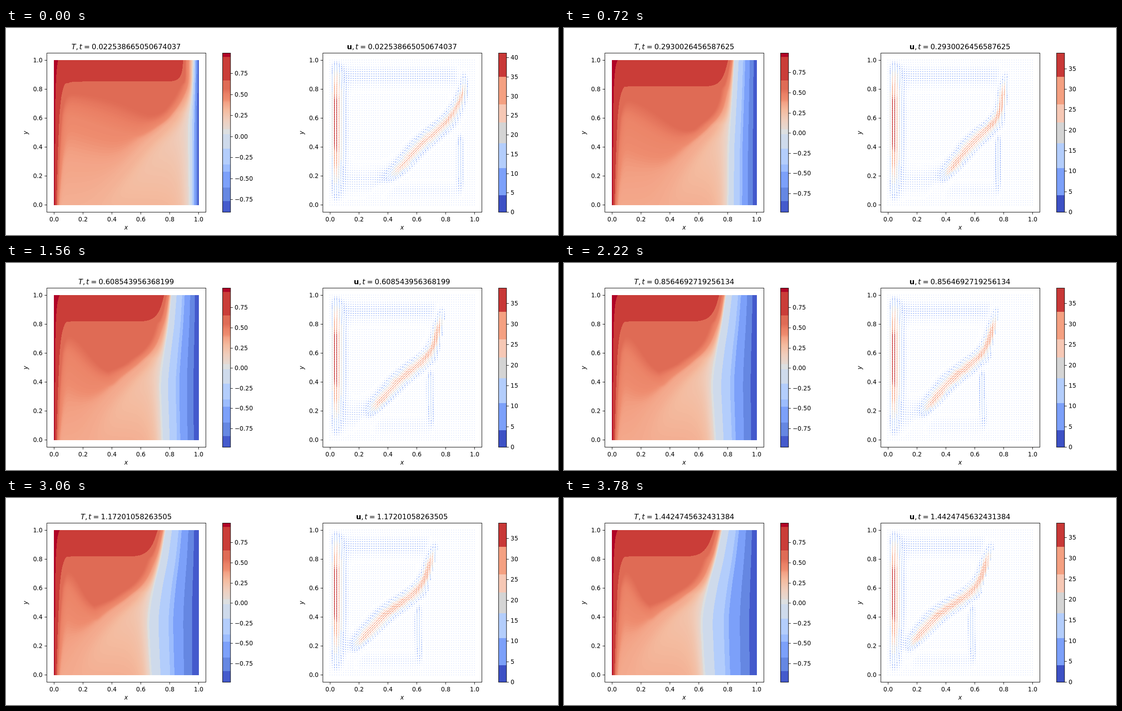
These frames come from a looping animation (1222x458 px, 3840 ms). An HTML page with a canvas:

```html
<!DOCTYPE html>
<html lang="en">
<head>
<meta charset="utf-8">
<style>
html, body { margin: 0; width: 1222px; height: 458px; overflow: hidden; background: #fff; }
canvas { display: block; }
</style>
</head>
<body>
<canvas id="c" width="1222" height="458"></canvas>
<script>
const ctx = document.getElementById('c').getContext('2d', { willReadFrequently: true });
const FONT = '"DejaVu Sans", sans-serif';
const TOP = 55.5, BOTTOM = 407.5, SIDE = 352, INSET = 16, SPAN = 320.5;
const STEP_MS = 60, STEPS = 64, DT = 0.022538665050674037;

// Shapes of the jet axis and the freezing front, sampled at y = 0, .2 ... 1
const KEY_STEPS = [0, 12, 26, 37, 45, 57, 63];
const JET = [
  [.26, .44, .615, .825, .922, .92],
  [.29, .405, .56, .75, .8, .825],
  [.2, .3, .47, .685, .755, .785],
  [.17, .265, .425, .65, .73, .765],
  [.1, .205, .38, .625, .71, .75],
  [.08, .18, .355, .6, .69, .735],
  [.06, .165, .335, .595, .685, .73]];
const FRONT = [
  [.945, .945, .945, .948, .957, .965],
  [.803, .805, .808, .82, .833, .845],
  [.75, .742, .737, .76, .79, .81],
  [.715, .703, .695, .72, .757, .787],
  [.69, .677, .67, .7, .745, .775],
  [.655, .645, .643, .675, .725, .765],
  [.64, .628, .623, .66, .715, .76]];
const STRATA = [[0, .355], [.29, .395], [.6, .46], [.72, .54], [.815, .63], [.82, .66], [1, .9]];

// Colour bands: lower bound and colour; a third entry marks a smooth stretch
const HEAT = [[0, '#445acc'], [.07, '#6587e2'], [.155, '#7ca0f9'], [.255, '#9cbcfd'],
  [.3, '#b3cdfb'], [.4, '#cedaeb'], [.49, '#dcdfe0'], [.52, '#e3d9d3', 1], [.58, '#efcebd', 1],
  [.64, '#f4bb9f', 1], [.69, '#f3a184', 1], [.707, '#ee8c6f', 1], [.745, '#ea7f64', 1],
  [.775, '#df6b55'], [.828, '#ca3d38'], [.977, '#b00426']];
const SPEED = [[0, '#3d51c5'], [.107, '#7ca0f9'], [.278, '#b3cdfb'], [.434, '#d4d4d4'],
  [.565, '#f6c8b5'], [.677, '#f4a081'], [.85, '#c83837']];

const clamp = (v, a = 0, b = 1) => Math.min(b, Math.max(a, v));
const mix = (a, b, k) => a + (b - a) * k;
const smooth = (a, b, v) => { const k = clamp((v - a) / (b - a)); return k * k * (3 - 2 * k); };
const bell = (v, mid, w) => Math.exp(-(((v - mid) / w) ** 2));

function curve(p, y) {
  const s = clamp(y) * 5, i = Math.min(4, Math.floor(s)), k = s - i;
  const b = p[i], c = p[i + 1], a = i ? p[i - 1] : 2 * b - c, d = i < 4 ? p[i + 2] : 2 * c - b;
  return b + k / 2 * (c - a + k * (2 * a - 5 * b + 4 * c - d + k * (3 * (b - c) + d - a)));
}

function blend(table, step) {
  let i = 0;
  while (i < 5 && step > KEY_STEPS[i + 1]) i++;
  const from = Math.log(KEY_STEPS[i] + 1), to = Math.log(KEY_STEPS[i + 1] + 1);
  const k = (Math.log(step + 1) - from) / (to - from);
  return table[i].map((v, j) => mix(v, table[i + 1][j], k));
}

function strata(y) {
  let i = 1;
  while (i < STRATA.length - 1 && y > STRATA[i][0]) i++;
  const [y0, a] = STRATA[i - 1], [y1, b] = STRATA[i];
  return mix(a, b, (y - y0) / (y1 - y0));
}

function ramp(bands) {
  const g = ctx.createLinearGradient(0, BOTTOM, 0, TOP);
  bands.forEach(([at, color, soft], i) => {
    g.addColorStop(at, color);
    const next = bands[i + 1];
    if (!soft) g.addColorStop(next ? next[0] : 1, color);
  });
  return g;
}

function lookup(gradient) {
  ctx.fillStyle = gradient;
  ctx.fillRect(0, 56, 1, 351);
  return ctx.getImageData(0, 56, 1, 351).data;
}

const heatRamp = ramp(HEAT), speedRamp = ramp(SPEED);
const heatLut = new Uint32Array(lookup(heatRamp).buffer);
const speedData = lookup(speedRamp);
const speedCss = Array.from({ length: 351 }, (_, i) => `rgb(${speedData.slice(i * 4, i * 4 + 3).join()})`);
const lutIndex = f => Math.round((1 - clamp(f)) * 350);

function rowShape(s, y) {
  const jet = curve(s.jet, y), front = curve(s.front, y);
  const slope = (curve(s.jet, y + .02) - curve(s.jet, y - .02)) / (clamp(y + .02) - clamp(y - .02));
  return { jet, front, slope };
}

const heatImage = ctx.createImageData(321, 321);
const heatPixels = new Uint32Array(heatImage.data.buffer);

function drawHeat(s) {
  const sag = 3 + 50 * Math.max(0, .62 - curve(s.jet, .4));
  for (let row = 0; row <= 320; row++) {
    const y = 1 - row / 320, { jet, front, slope } = rowShape(s, y);
    const wallWidth = .02 + .03 * y, jetWidth = .038 + .05 * Math.max(0, slope);
    const atJet = .35 + .4 * Math.max(0, y - .55), pool = .33 - .2 * y;
    const skin = clamp((front - jet) / 2.5, .006, .04);
    const dip = sag * Math.max(0, .82 - y) * Math.max(0, y - .2);
    const depth = y - .028 * s.settle * y;
    for (let col = 0; col <= 320; col++) {
      const x = col / 320;
      let T;
      if (x >= front) T = s.low * (x - front) / (1 - front);
      else {
        if (x < jet) {
          const lift = Math.min(.28, dip * Math.max(0, x - .09));
          const core = strata(Math.min(depth + lift, Math.max(depth, .8)));
          T = core - (core - atJet) * Math.exp(-(((jet - x) / jetWidth) ** 1.3));
        } else T = pool + (atJet - pool) * bell(x, jet, .1);
        T *= 1 - Math.exp((x - front) / skin);
        if (x < .2) T += (1 - T) * Math.exp(-((x / wallWidth) ** 1.5));
      }
      heatPixels[row * 321 + col] = heatLut[lutIndex((T - s.low) / (s.high - s.low))];
    }
  }
  ctx.putImageData(heatImage, 106, 71);
}

function velocity(x, y, s, { jet, front, slope }) {
  if (x > front) return [0, 0];
  const norm = Math.hypot(1, slope), off = (x - jet) / norm;
  const peak = 25 + 3.5 * bell(y, .74, .07) * clamp(s.step / 6);
  const width = .022 + .026 * clamp(slope);
  const push = smooth(.1, .3, y) * (1 - smooth(.78, .97, y)) * (peak * bell(off, 0, width) + 4 * bell(off, 0, .09));
  const rise = Math.max(0, Math.sin(Math.PI * y ** 1.16)) ** .65;
  const wall = s.fastest * ((x / .04) * Math.exp(1 - x / .04)) ** 2 * rise;
  const inner = smooth(.02, .1, x), left = smooth(0, .08, jet - x);
  const lid = 7 * bell(y, .89, .1) * smooth(1, .96, y);
  const floor = smooth(0, .05, y);
  const u = inner * left * (lid - 5.5 * bell(y, .17, .13) * floor)
    + 5 * bell(y, .1, .08) * floor * smooth(0, .1, x - jet) * smooth(0, .06, front - x)
    - push * slope / norm;
  const v = wall - push / norm + 14 * bell(x, front - .045, .026) * smooth(.02, .2, y) * smooth(.55, .4, y);
  return [u, v];
}

function drawArrow(x, y, u, v, max) {
  const speed = Math.hypot(u, v), len = speed * .5;
  if (len < .9) {
    ctx.fillStyle = '#7ca0f9';
    ctx.fillRect(x - .4, y - .4, .8, .8);
    return;
  }
  const head = Math.min(len, 4), dx = u / speed, dy = -v / speed;
  const at = (along, side) => [x + dx * along - dy * side, y + dy * along + dx * side];
  const w = .3 * head / 4 + .08, neck = len - head, wing = head * .25;
  ctx.fillStyle = speedCss[lutIndex(Math.max(.12, speed / max))];
  ctx.beginPath();
  [[0, w], [neck, w], [neck, wing], [len, 0], [neck, -wing], [neck, -w], [0, -w]]
    .forEach(p => ctx.lineTo(...at(...p)));
  ctx.fill();
}

function drawArrows(s) {
  for (let j = 0; j < 64; j++) {
    const y = j / 63, shape = rowShape(s, y);
    for (let i = 0; i < 64; i++) {
      const x = i / 63, [u, v] = velocity(x, y, s, shape);
      drawArrow(717 + x * 320, 391.5 - y * SPAN, u, v, s.fastest);
    }
  }
}

function text(str, x, y, align, style = '') {
  ctx.font = `${style} 13.25px ${FONT}`;
  ctx.textAlign = align;
  ctx.fillStyle = '#000';
  ctx.fillText(str, x, y);
}

function line(x0, y0, x1, y1) {
  ctx.beginPath();
  ctx.moveTo(x0, y0);
  ctx.lineTo(x1, y1);
  ctx.stroke();
}

function drawTitle(mid, symbol, style, time) {
  const parts = [[symbol, style, 0], [',', '', 2.5], ['t', 'italic', 4], ['=', '', 4], [String(time), '', 0]];
  const setFont = s => ctx.font = `${s} 15.9px ${FONT}`;
  const widths = parts.map(([str, s, gap]) => { setFont(s); return ctx.measureText(str).width + gap; });
  let x = mid - widths.reduce((a, b) => a + b) / 2;
  ctx.textAlign = 'left';
  ctx.fillStyle = '#000';
  parts.forEach(([str, s], i) => { setFont(s); ctx.fillText(str, x, 46.5); x += widths[i]; });
}

function drawAxes(x) {
  ctx.strokeRect(x, TOP, SIDE, SIDE);
  for (let i = 0; i <= 5; i++) {
    const label = (i / 5).toFixed(1), px = Math.round(x + INSET + i / 5 * 320.5 - 1) + .5;
    const py = Math.round(391 - i / 5 * SPAN) + .5;
    line(px, BOTTOM, px, BOTTOM + 5);
    line(x - 5, py, x, py);
    text(label, px, 427.5, 'center');
    text(label, x - 9.5, py + 4.8, 'right');
  }
  text('x', x + 175.5, 445.5, 'center', 'italic');
  ctx.save();
  ctx.translate(x - 43, 231.5);
  ctx.rotate(-Math.PI / 2);
  text('y', 0, 0, 'center', 'italic');
  ctx.restore();
}

function drawBar(x, gradient, low, high, step, digits) {
  ctx.fillStyle = gradient;
  ctx.fillRect(x, TOP, 17.5, SIDE);
  ctx.strokeRect(x, TOP, 17.5, SIDE);
  for (let n = Math.ceil(low / step); n * step <= high; n++) {
    const y = Math.round(BOTTOM - (n * step - low) / (high - low) * SIDE - .5) + .5;
    line(x + 17.5, y, x + 22.5, y);
    text((n * step).toFixed(digits).replace('-', '\u2212'), x + 26.5, y + 4.8, 'left');
  }
}

function draw(step) {
  const settle = Math.exp(-step / 3);
  const s = {
    step, settle, jet: blend(JET, step), front: blend(FRONT, step),
    low: -.982 + .084 * settle, high: .994,
    fastest: 38.8 - .25 * smooth(57, 63, step) + 2.4 * settle
  };
  const time = (step + 1) * DT;
  ctx.fillStyle = '#fff';
  ctx.fillRect(0, 0, 1222, 458);
  ctx.strokeStyle = '#000';
  ctx.lineWidth = 1;
  drawHeat(s);
  drawArrows(s);
  drawAxes(90.5);
  drawAxes(701.5);
  drawBar(479.5, heatRamp, s.low, s.high, .25, 2);
  drawBar(1090.5, speedRamp, 0, s.fastest, 5, 0);
  drawTitle(266, 'T', 'italic', time);
  drawTitle(876.5, 'u', 'bold', time);
}

let shown = -1;
function tick() {
  const step = Math.floor(performance.now() / STEP_MS) % STEPS;
  if (step !== shown) draw(shown = step);
  requestAnimationFrame(tick);
}
tick();
</script>
</body>
</html>
```
